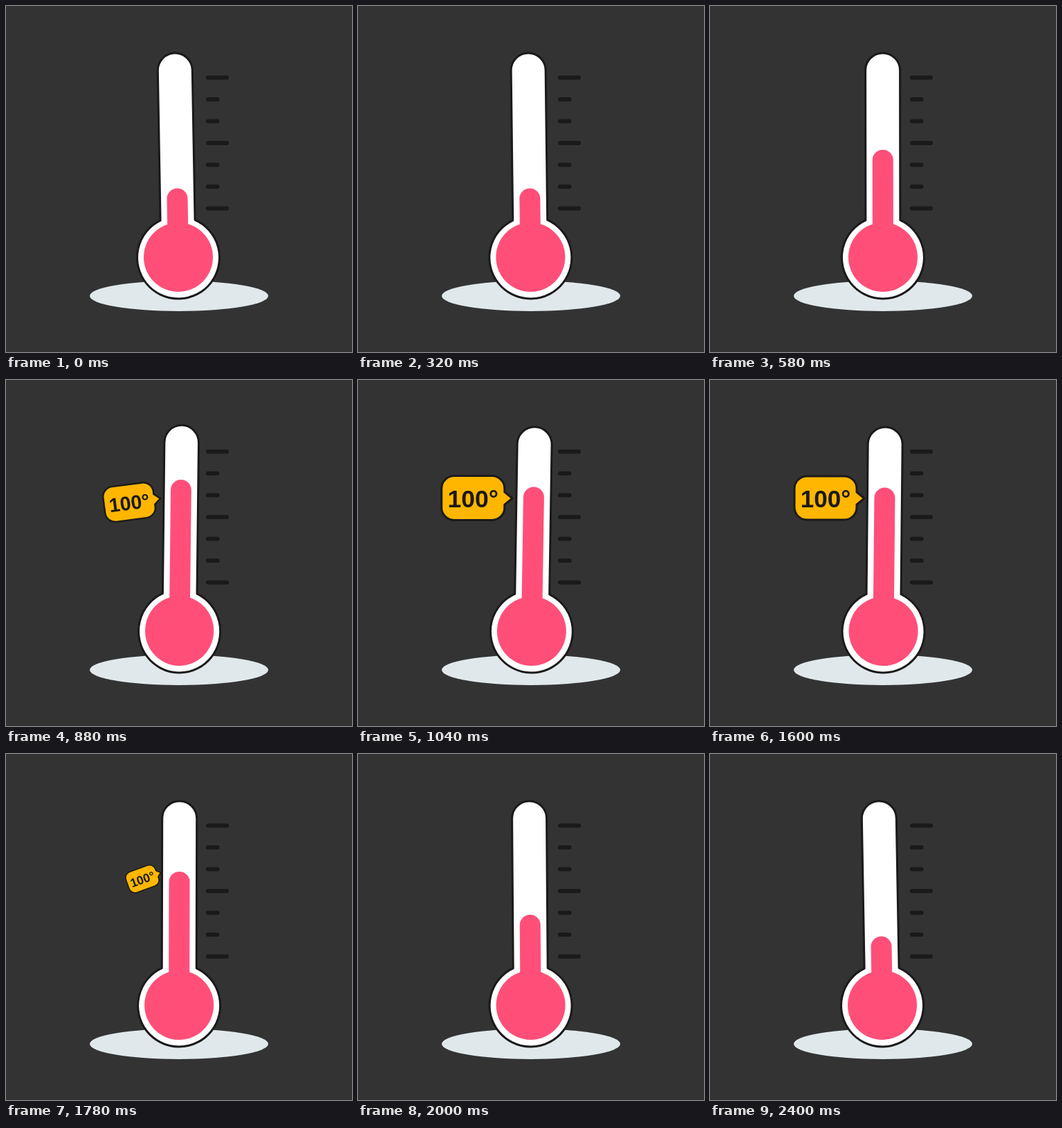
Recreate the animation shown at these times as an HTML page. Size 500x500 px, loop 2440 ms.

```html
<!DOCTYPE html>
<html lang="en">
<head>
<meta charset="utf-8">
<title>Thermometer</title>
<style>
html, body { margin: 0; width: 100%; height: 100%; overflow: hidden; background: #333; }
svg { display: block; width: 100%; height: 100%; }
.line { stroke: #1a1a1a; stroke-width: 3; stroke-linejoin: round; }
text { font: bold 35px "Liberation Sans", Arial, sans-serif; fill: #1a1a1a; }
</style>
</head>
<body>
<svg viewBox="0 0 500 500">
  <rect width="500" height="500" fill="#333"/>
  <ellipse cx="250" cy="419" rx="129" ry="22" fill="#e1e8eb"/>
  <g id="ticks" fill="#1a1a1a"></g>
  <g id="glass">
    <path class="line" fill="#fff" d="M225 309.5V93a25 25 0 0 1 50 0V309.5A59.5 59.5 0 1 1 225 309.5Z"/>
    <circle cx="250" cy="363" r="50" fill="#ff4f79"/>
    <path id="liquid" fill="#ff4f79"/>
  </g>
  <g id="badge">
    <path class="line" fill="#ffb600" d="M140 139H194a18 18 0 0 1 18 18V162L223 171L212 180V184a18 18 0 0 1-18 18H140a18 18 0 0 1-18-18V157a18 18 0 0 1 18-18Z"/>
    <text x="167" y="184" text-anchor="middle">100°</text>
  </g>
</svg>
<script>
const LOOP = 2440, LOW = 263.5, HIGH = 155.5, PEAK = 146;
const BASE = 419, TIP = [224, 171];
const $ = id => document.getElementById(id);
const glass = $('glass'), liquid = $('liquid'), badge = $('badge');

const span = (t, a, b) => Math.min(1, Math.max(0, (t - a) / (b - a)));
const ease = p => (1 - Math.cos(Math.PI * p)) / 2;
const back = (p, s) => 1 + (s + 1) * (p - 1) ** 3 + s * (p - 1) ** 2;

for (let i = 0; i < 7; i++) {
  const tick = document.createElementNS('http://www.w3.org/2000/svg', 'rect');
  const box = { x: 289, y: 100.5 + 31.5 * i, width: i % 3 ? 19.5 : 33, height: 6, rx: 2.7 };
  for (const key in box) tick.setAttribute(key, box[key]);
  $('ticks').append(tick);
}

function level(t) {
  return LOW + (PEAK - LOW) * ease(span(t, 310, 870))
    + (HIGH - PEAK) * ease(span(t, 880, 1080))
    + (LOW - HIGH) * ease(span(t, 1650, 2200));
}

function draw(t) {
  const sway = -Math.cos(2 * Math.PI * t / LOOP);
  const stretch = 1 + 0.0078 * (ease(span(t, 680, 870)) - ease(span(t, 890, 1080)));
  glass.setAttribute('transform',
    `translate(250 ${BASE}) rotate(${sway}) scale(${1 / stretch} ${stretch}) translate(-250 ${-BASE})`);

  liquid.setAttribute('d', `M235 350V${level(t) + 15}a15 15 0 0 1 30 0V350Z`);

  const grow = t < 1400 ? back(span(t, 780, 1090), 0.8) : 1 - span(t, 1640, 1840) ** 2;
  const size = Math.max(0, grow);
  const turn = Math.min(0, -40 * (1 - size));
  badge.setAttribute('display', size > 0.01 ? 'inline' : 'none');
  badge.setAttribute('transform',
    `translate(${TIP}) rotate(${turn}) scale(${size}) translate(${-TIP[0]} ${-TIP[1]})`);
}

function frame() {
  draw(performance.now() % LOOP);
  requestAnimationFrame(frame);
}
frame();
</script>
</body>
</html>
```
